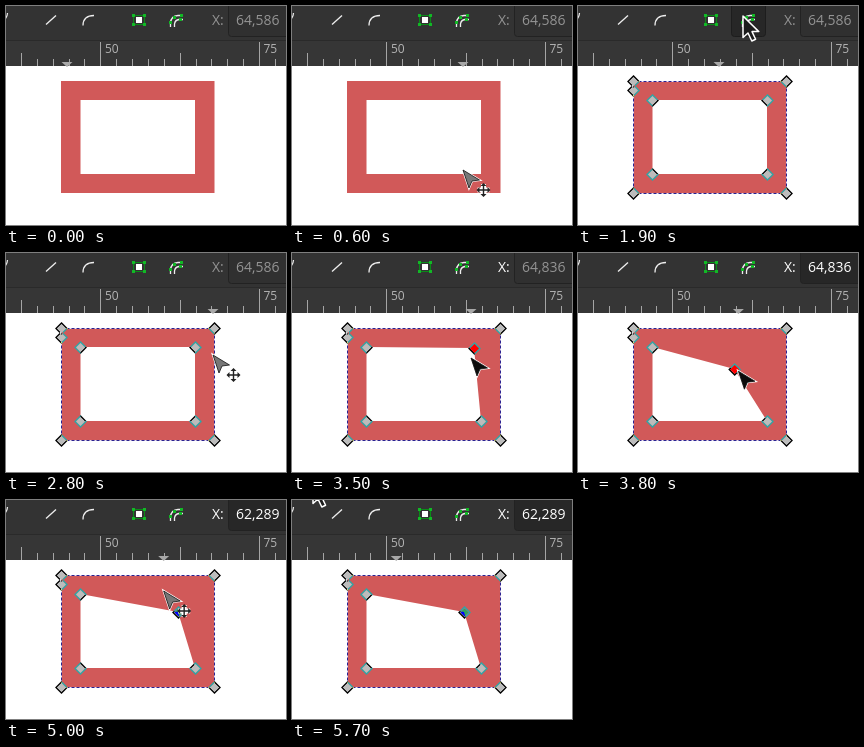
An HTML page that plays this animation: 280 by 219 pixels, repeating every 6 s.

```html
<!DOCTYPE html>
<html lang="en">
<head>
<meta charset="utf-8">
<title>Node editing</title>
<style>
  html, body { margin: 0; width: 100%; height: 100%; overflow: hidden; background: #fff; }
  svg { display: block; width: 100vw; height: 100vh; }
  text { font-family: "Open Sans", "Noto Sans", sans-serif; }
  .off { fill: #949494; }
  .on { fill: #fff; }
  .rim { fill: none; stroke: #fff; stroke-width: 1.5; mix-blend-mode: difference; }
  .core { fill: #bcbcbc; }
  .picked { fill: #f00; }
  .inverted { fill: #ff0; mix-blend-mode: difference; }
</style>
</head>
<body>
<svg viewBox="0 0 280 219">
  <defs>
    <path id="rim" d="M0 -5.4L5.4 0L0 5.4L-5.4 0Z"/>
    <path id="core" d="M0 -4.5L4.5 0L0 4.5L-4.5 0Z"/>
    <path id="ptr" d="M0 0V21.5L5 17L8.8 25L12.6 23.2L9 15.6H15.8Z"/>
    <path id="dart" d="M0 0L16.500 10L9 11L6 18Z"/>
  </defs>

  <rect width="280" height="219" fill="#fff"/>
  <path id="shape" fill="#d15959" fill-rule="evenodd"/>
  <g id="outline" fill="none">
    <rect x="55.500" y="75.500" width="153" height="112" stroke="#e6dcee"/>
    <rect x="55.500" y="75.500" width="153" height="112" stroke="#2c2290" stroke-dasharray="3 2"/>
  </g>
  <g id="handles"></g>
  <g id="nodes"></g>

  <rect width="280" height="60" fill="#333"/>
  <rect y="35" width="280" height="25" fill="#363636"/>
  <path d="M0 34.500H280" stroke="#2a2a2a"/>
  <path id="ticks" stroke="#a5a5a5"/>
  <g font-size="12" fill="#b4b4b4">
    <text x="99" y="47">50</text>
    <text x="257.500" y="47">75</text>
  </g>
  <path id="marker" d="M-5.500 56H5.500L0 61Z" fill="#a8a8a8"/>

  <rect id="hover" x="153.500" y="-4.500" width="34" height="35" rx="3" fill="#272727" stroke="#1d1d1d"/>
  <g fill="none" stroke="#eee" stroke-width="1.3">
    <path d="M-3 14Q1 13 1.500 7"/>
    <path d="M40 18.500L50 9.500"/>
    <path d="M77 19.500C77 13 81 9.500 88 9.500"/>
    <path d="M164.500 21V17Q165 10 172 9.500H177M168.500 21V18Q169 14 173 13.500H177"/>
  </g>
  <rect x="127.500" y="9.500" width="11" height="9" fill="none" stroke="#0a8a18"/>
  <rect x="130" y="11" width="6" height="6" fill="#fff"/>
  <path d="M126 8h3v3h-3zM137 8h3v3h-3zM126 17h3v3h-3zM137 17h3v3h-3zM163 15h3v3h-3zM167 10h3v3h-3zM174 8h3v3h-3zM173 12h3v3h-3z" fill="#12b826"/>

  <rect id="field" x="222.500" y="-4.500" width="66" height="35" rx="3" stroke="#222"/>
  <g font-size="14" font-weight="500">
    <text id="label" x="206" y="19">X:</text>
    <text id="value" x="230" y="19"></text>
  </g>

  <g id="cursor">
    <use id="plain" href="#ptr" fill="#1c1c1c" stroke="#fff" stroke-width="1.5" stroke-linejoin="round"/>
    <g id="edit">
      <use href="#dart" stroke="#fff" stroke-width="2.200"/>
      <use id="dartFill" href="#dart" stroke="#111" stroke-width=".8"/>
    </g>
    <g id="cross" transform="translate(20.500 20)">
      <path d="M-6 0H6M0 -6V6" stroke="#fff" stroke-width="5"/>
      <path d="M-5 0H5M0 -5V5" stroke="#222" stroke-width="1.4"/>
      <path d="M-7 0l3-3v6zM7 0l-3-3v6zM0-7l-3 3h6zM0 7l-3-3h6z" fill="#222"/>
    </g>
  </g>
</svg>
<script>
const LOOP = 6000, STEP = 100;
const SELECT = 900, CONVERT = 1900, GRAB = 3200, DROP = 5000;
const $ = id => document.getElementById(id);
const set = (id, attrs) => {
  for (const name in attrs) $(id).setAttribute(name, attrs[name]);
};
const show = (id, on) => set(id, { display: on ? 'inline' : 'none' });
const move = (id, x, y) => set(id, { transform: `translate(${x} ${y})` });

// Key points: [ms, x, y]
const pointer = [
  [200, 61, 235], [600, 171, 164], [SELECT, 171, 164], [1100, 141, 32], [1500, 162, 7],
  [1700, 165, 10], [2100, 165, 10], [2800, 207, 102], [GRAB, 189, 97], [3500, 179, 105],
  [4000, 148, 127], [4800, 174, 114], [4900, 174, 114], [5200, 125, 45], [5700, 21, -18]
];
const corner = [[3300, 189, 94], [3500, 182, 95], [4000, 139, 130], [4300, 145, 127], [4800, 172, 112]];

function at(track, t) {
  const i = track.findIndex(k => k[0] > t);
  if (i <= 0) return track.at(i).slice(1);
  const [t0, x0, y0] = track[i - 1], [t1, x1, y1] = track[i];
  const p = (t - t0) / (t1 - t0);
  return [x0 + (x1 - x0) * p, y0 + (y1 - y0) * p];
}

// The ruler keeps the last place where the pointer was below the toolbar.
function rulerX(t) {
  while (at(pointer, t)[1] < 32) t -= STEP;
  return at(pointer, t)[0];
}

const inBox = (x, y, l, t, r, b) => x > l && x < r && y > t && y < b;

const node = (x, y, id = '') =>
  `<use href="#rim" class="rim" x="${x}" y="${y}" ${id && `id="${id}Rim"`}/>` +
  `<use href="#core" class="core" x="${x}" y="${y}" ${id && `id="${id}Core"`}/>`;
const corners = (l, t, r, b) => node(l, t) + node(r, t) + node(l, b) + node(r, b);

$('handles').innerHTML = corners(65.5, 84.5, 198.5, 177.5);
$('nodes').innerHTML = node(55.5, 84.5) + corners(55.5, 75.5, 208.5, 187.5) +
  node(74.5, 94.5) + node(74.5, 168.5) + node(189.5, 168.5) + node(0, 0, 'active');

let ticks = '';
for (let i = -5; i <= 11; i++) {
  const x = Math.round(95.3 + i * 15.87) - 0.5;
  ticks += `M${x} ${i % 10 === 0 ? 36 : i % 5 === 0 ? 47 : 53}V60`;
}
set('ticks', { d: ticks });

function draw(t) {
  const [cx, cy] = at(pointer, t), [nx, ny] = at(corner, t);
  const picked = t >= GRAB, dropped = t >= DROP, live = t >= GRAB + 400;

  set('shape', { d: `M55 75H208.5V187H55ZM74.5 94L${nx} ${ny}L189 168H74.5Z` });
  show('outline', t >= SELECT);
  show('handles', t >= SELECT && t < CONVERT);
  show('nodes', t >= CONVERT);
  for (const id of ['activeRim', 'activeCore']) set(id, { x: nx + 0.5, y: ny + 0.5 });
  set('activeCore', { class: dropped ? 'inverted' : picked ? 'picked' : 'core' });

  move('marker', rulerX(t), 0);
  show('hover', inBox(cx, cy, 153, 0, 188, 30));
  set('field', { fill: live ? '#272727' : '#303030' });
  set('label', { class: picked ? 'on' : 'off' });
  set('value', { class: live ? 'on' : 'off' });
  $('value').textContent = dropped ? '62,289' : picked ? '64,836' : '64,586';

  const canvas = cy >= 60, dragging = picked && !dropped;
  const over = canvas && !dragging &&
    inBox(cx, cy, 50, 70, 214, 192) && !inBox(cx, cy, 83, 103, 181, 160);
  move('cursor', cx, cy);
  show('plain', !canvas);
  show('edit', canvas);
  show('cross', over);
  set('dartFill', { fill: over ? '#777' : '#0c0c0c' });
}

function tick() {
  draw(Math.floor(performance.now() % LOOP / STEP) * STEP);
  requestAnimationFrame(tick);
}
tick();
</script>
</body>
</html>
```
